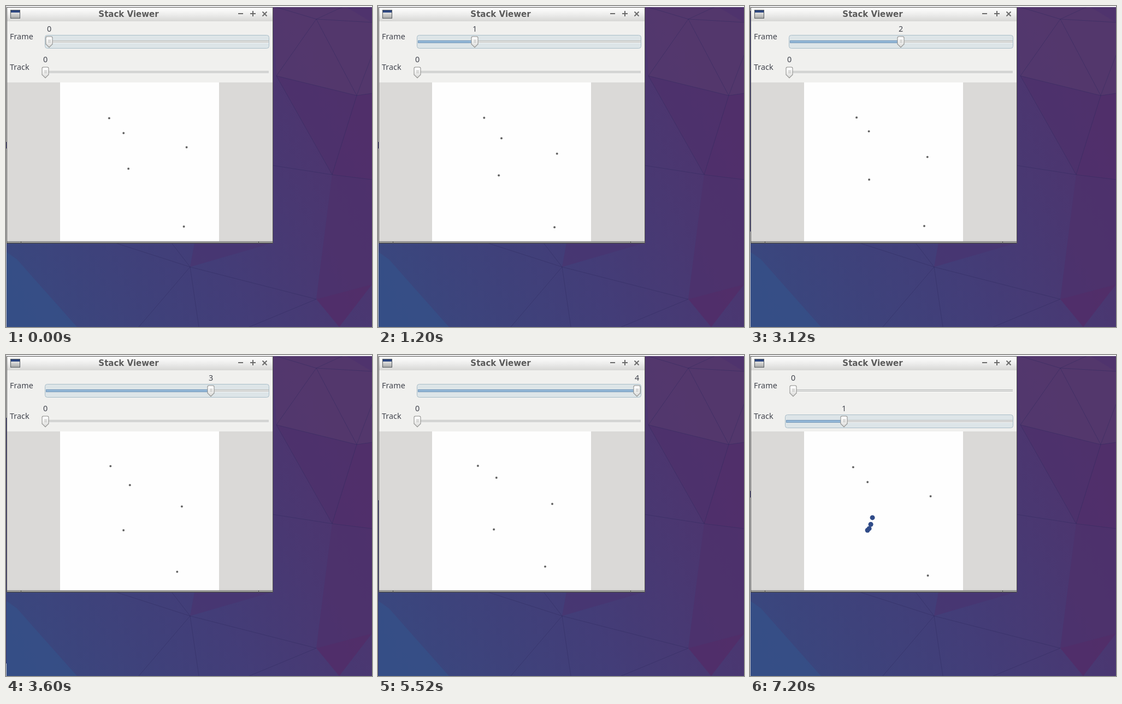
These frames come from a looping animation (670 by 588 pixels, 8 s). An HTML page with a canvas:

```html
<!DOCTYPE html>
<html lang="en">
<head>
<meta charset="utf-8">
<title>Stack Viewer</title>
<style>
html, body { margin: 0; width: 100%; height: 100%; overflow: hidden; }
canvas { display: block; }
</style>
</head>
<body>
<canvas id="stage" width="670" height="588"></canvas>
<script>
const ctx = document.getElementById('stage').getContext('2d');
const STEP = 1200, LOOP = 8000;
const DARK = '#555553', PANEL = '#f0f0ee', ICON = '#6a6a6a';

// Each particle drifts along a parabola around its middle position; swing displaces odd images
const particles = [
  { mid: [195.1, 204.2], drift: [-1.5, -.6], bend: [-2.3, 0] },
  { mid: [217.6, 229.6], drift: [.4, -2], bend: [-.4, -.2], swing: [9.2, 10.8] },
  { mid: [324.8, 276.6], drift: [-2.9, 3.5], bend: [0, -2.7] },
  { mid: [218.1, 317.9], drift: [-3, 5.4], bend: [0, -2.3] },
  { mid: [319, 403], drift: [-4.9, -4.1], bend: [-.8, -1.8] }
];

function position({ mid, drift, bend, swing = [0, 0] }, image) {
  const t = image - 2;
  return mid.map((m, i) => m + drift[i] * t + bend[i] * t * t + swing[i] * (image % 2));
}

// Wallpaper mesh: lettered corners, facets and seams spelled with them
const corners = {
  a: [568, 24], b: [495, 128], c: [642, 164], d: [597, 309], e: [568, 537], f: [337, 478], g: [20, 464],
  h: [488, 0], i: [620, 0], j: [670, 30], k: [670, 90], l: [670, 160], m: [670, 318], n: [670, 510],
  o: [610, 588], p: [445, 588], q: [353, 588], r: [243, 588], s: [130, 588], t: [0, 588], u: [0, 450],
  v: [100, 434], w: [200, 434], x: [303, 434], y: [345, 434], z: [488, 434], B: [488, 292]
};
const facets = {
  '#54396d': ['hab', 'ajlc', 'acb', 'hija'],
  '#512e6a': ['cdml'],
  '#4e316b': ['bcd', 'dmne'],
  '#532b67': ['eno'],
  '#493470': ['fyz'],
  '#355088': ['ugst']
};
const seams = 'iabca haj ck bdcl Bdm wfx rfq fep';

function rect(x, y, w, h, fill) {
  ctx.fillStyle = fill;
  ctx.fillRect(x, y, w, h);
}

function gradient(x0, y0, x1, y1, ...colors) {
  const g = ctx.createLinearGradient(x0, y0, x1, y1);
  colors.forEach((c, i) => g.addColorStop(i / (colors.length - 1), c));
  return g;
}

function line(points, stroke, width = 1) {
  ctx.beginPath();
  points.forEach(p => ctx.lineTo(...p));
  ctx.lineWidth = width;
  ctx.strokeStyle = stroke;
  ctx.stroke();
}

function dot(x, y, r, fill) {
  ctx.fillStyle = fill;
  ctx.beginPath();
  ctx.arc(x, y, r, 0, 7);
  ctx.fill();
}

function text(label, x, y, align, font = '14.4px "Noto Sans", "Open Sans", sans-serif', fill = '#41444d') {
  ctx.font = font;
  ctx.textAlign = align;
  ctx.fillStyle = fill;
  ctx.fillText(label, x, y);
}

function wallpaper() {
  const path = name => [...name].map(k => corners[k]);
  rect(0, 0, 670, 588, gradient(40, 588, 670, 260, '#39487f', '#3e427b', '#433d78', '#493872', '#4f336d'));
  ctx.globalAlpha = .75;
  for (const [fill, names] of Object.entries(facets)) {
    for (const name of names) {
      ctx.beginPath();
      path(name).forEach(p => ctx.lineTo(...p));
      ctx.fillStyle = fill;
      ctx.fill();
    }
  }
  ctx.globalAlpha = 1;
  seams.split(' ').forEach(name => line(path(name), 'rgba(46,42,92,.4)'));
  rect(0, 0, 670, 2, '#f6f6f8');
}

// One-pixel edge of the page behind, scrolled differently for each image
function pageEdge(image) {
  const [top, bottom] = [[249, 261], [249, 261], [9, 413], [115, 565], [266, 588]][image];
  rect(0, 0, 1, 588, '#c9c9cb');
  rect(0, top, 1, bottom - top, '#36356f');
}

function windowFrame() {
  rect(1, 2, 488, 433, DARK);
  rect(2, 3, 486, 25, gradient(0, 3, 0, 28, '#ffffff', '#ededec', '#d7d7d5'));
  rect(2, 28, 486, 112, PANEL);
  rect(2, 140, 486, 291, '#dad9d7');
  rect(99, 140, 291, 291, '#fefefe');
  rect(2, 432, 486, 2, PANEL);
  rect(2, 433, 486, 1, DARK);
  for (const x of [27, 462]) rect(x, 432, 1, 2, DARK);

  rect(8, 7, 18, 16, '#555b60');
  rect(9, 8, 16, 4, '#2d4780');
  rect(9, 12, 16, 10, gradient(0, 12, 0, 22, '#e3e3e2', '#a9aaa9'));
  text('Stack Viewer', 224.5, 20, 'center', 'bold 15px "DejaVu Sans", sans-serif', '#5a5a5a');
  line([[425, 14], [434, 14]], ICON, 2);
  line([[447, 14], [457, 14]], ICON, 2);
  line([[452, 9], [452, 19]], ICON, 2);
  line([[469.5, 10.5], [477.5, 18.5]], ICON, 2);
  line([[477.5, 10.5], [469.5, 18.5]], ICON, 2);
}

function thumb(x, y) {
  ctx.beginPath();
  ctx.roundRect(x - 5.5, y - 8.5, 11, 13, [2, 2, 0, 0]);
  ctx.moveTo(x - 5.5, y + 4.5);
  ctx.lineTo(x, y + 10);
  ctx.lineTo(x + 5.5, y + 4.5);
  ctx.strokeStyle = '#898987';
  ctx.lineWidth = 2;
  ctx.stroke();
  ctx.fillStyle = gradient(0, y - 9, 0, y + 10, '#ffffff', '#f2f2f1', '#d9d9d7');
  ctx.fill();
  for (let i = -3; i <= 1; i += 2) rect(x - 2, y + i, 5, 1, '#c0c0be');
}

function slider(name, y, start, value, focused) {
  const x = Math.floor(start + (474 - start) * value / 4);
  const left = start - 6, width = 481 - left;
  text(name, 7, y - 4, 'left');
  text(value, x, y - 18, 'center');
  if (focused) {
    ctx.beginPath();
    ctx.roundRect(start - 7.5, y - 11.5, 489 - start, 24, 4);
    ctx.fillStyle = '#dde5e8';
    ctx.fill();
    ctx.strokeStyle = '#a9bdc8';
    ctx.lineWidth = 1;
    ctx.stroke();
  }
  rect(left, y - 2, width, 4, '#bdbebd');
  rect(left, y - 1, width, 2, '#dfe0df');
  rect(left, y + 2, width, 1, '#fafafa');
  if (value) {
    rect(left, y - 2, x - left, 5, '#7396b8');
    rect(left + 1, y - 1, x - left, 3, '#93b7d7');
  }
  thumb(x, y);
}

function draw(step) {
  const tracking = step > 4;
  const image = tracking ? 0 : step;
  const track = tracking ? step - 5 : 0;
  wallpaper();
  pageEdge(image);
  windowFrame();
  slider('Frame', 65, 79, image, !tracking);
  slider('Track', 121, 72, track, tracking);
  for (const particle of particles) {
    const [x, y] = position(particle, image);
    dot(x, y, 2.2, '#acacac');
    dot(x, y, 1.5, '#545454');
  }
  if (tracking) {
    for (let i = 0; i < 4; i++) dot(...position(particles[4 - track], i), 4.5, '#304b88');
  }
}

let shown = -1;
function tick() {
  const step = Math.floor(performance.now() % LOOP / STEP);
  if (step !== shown) draw(shown = step);
  requestAnimationFrame(tick);
}
tick();
</script>
</body>
</html>
```
